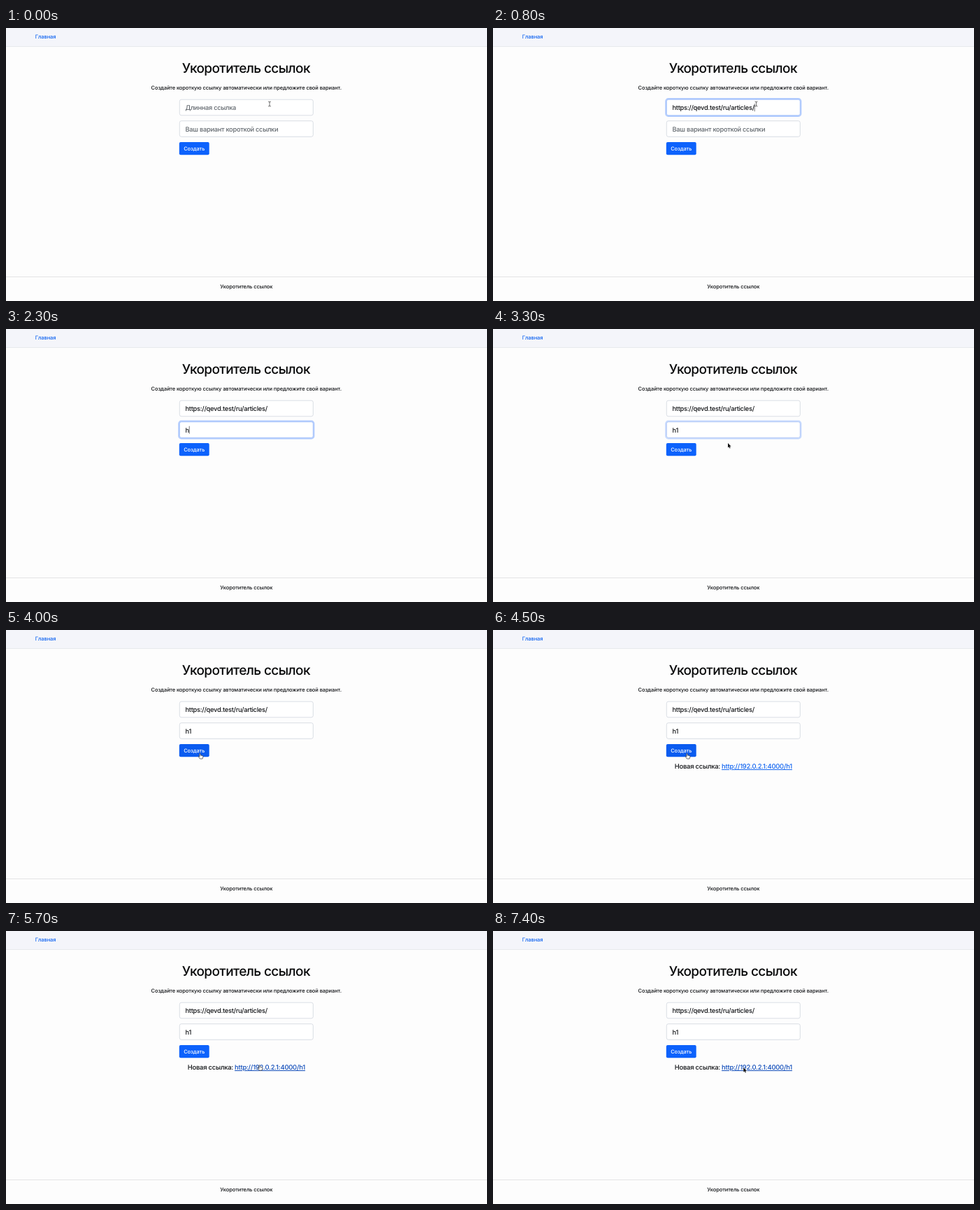
Recreate the animation shown at these times as an HTML page. Size 688 by 390 pixels, loop 8 s.

```html
<!DOCTYPE html>
<html lang="ru">
<head>
<meta charset="utf-8">
<title>Укоротитель ссылок</title>
<style>
  html, body { margin: 0; width: 100%; height: 100%; overflow: hidden; background: #fdfdfd; }
  svg { display: block; width: 100%; height: 100%; }
  text {
    font: 450 7.52px Inter, "Liberation Sans", sans-serif;
    letter-spacing: -.012em; fill: #101215;
    text-rendering: geometricPrecision; white-space: pre;
  }
  .mid { text-anchor: middle; }
  .end { text-anchor: end; }
  .title { font-size: 19px; font-weight: 500; letter-spacing: -.031em; fill: #08090a; }
  .large { font-size: 9.25px; letter-spacing: -.028em; }
  .result { font-size: 9.42px; font-weight: 500; letter-spacing: -.023em; }
  .hint { fill: #63696f; }
  .nav { fill: #0d62f0; }
  .link { text-decoration: underline; }
  .box { fill: #fff; stroke-width: .7; }
  .ring { fill: none; stroke: #0d5efd; stroke-opacity: .3; stroke-width: 2; }
  .caret { stroke: #15171a; stroke-width: .6; }
</style>
</head>
<body>
<svg viewBox="0 0 688 390">
  <rect width="688" height="390" fill="#fdfdfd"/>
  <rect width="688" height="26.5" fill="#f4f5fa"/>
  <path d="M0 26.5H688" stroke="#e4e6e9" stroke-width=".8"/>
  <text class="nav" x="41.7" y="15.4">Главная</text>
  <text class="title mid" x="343.4" y="63.9">Укоротитель ссылок</text>
  <text class="mid" x="343.7" y="87.6">Создайте короткую ссылку автоматически или предложите свой вариант.</text>
  <g id="fields"></g>
  <rect id="button" x="247.8" y="162.9" width="42.9" height="18.4" rx="2"/>
  <text class="mid" x="269.3" y="174.9" style="fill:#fff">Создать</text>
  <g id="result">
    <text class="large result end" x="325" y="198">Новая ссылка:</text>
    <text id="link" class="large result link" x="327" y="198">http://192.0.2.1:4000/h1</text>
  </g>
  <path d="M0 355.5H688" stroke="#e0e1e3" stroke-width=".9"/>
  <text class="mid" x="343.8" y="372">Укоротитель ссылок</text>
  <g id="cursor" stroke-linejoin="round" stroke-linecap="round">
    <path data-kind="beam" fill="none" stroke="#333" stroke-width=".7"
      d="M-1.5-3.4Q0-3.4 0-2.4Q0-3.4 1.5-3.4M0-2.4V2.4M-1.5 3.4Q0 3.4 0 2.4Q0 3.4 1.5 3.4"/>
    <path data-kind="arrow" fill="#111" stroke="#fff" stroke-width=".6" paint-order="stroke"
      d="M0 0V6.6L1.5 5.2L2.5 7.6L3.6 7.1L2.6 4.8H4.6Z"/>
    <path data-kind="hand" fill="#fff" stroke="#222" stroke-width=".65"
      d="M-.7 .7Q0-.4 .6 .7V3L2.3 3.2L4 3.8Q4.5 4.2 4.3 5.4L3.5 8H-.1L-2.1 5.2Q-2.4 4.2-1.4 4.3L-.7 5Z"/>
  </g>
</svg>
<script>
const LOOP = 8000, STEP = 100;
const $ = id => document.getElementById(id);
const clamp = v => Math.max(0, Math.min(1, v));
const ramp = (t, from, to) => clamp((t - from) / (to - from));
const within = (v, a, b) => v >= a && v < b;

function add(parent, tag, attrs) {
  const el = document.createElementNS('http://www.w3.org/2000/svg', tag);
  for (const key in attrs) el.setAttribute(key, attrs[key]);
  return parent.appendChild(el);
}

function makeField(y, hint) {
  const box = { x: 248.3, y, width: 191, height: 22.6, rx: 2.6 };
  const ring = { x: 247.2, y: y - 1.1, width: 193.2, height: 24.8, rx: 3.5, class: 'ring' };
  const g = $('fields');
  return {
    hint, y,
    ring: add(g, 'rect', ring),
    box: add(g, 'rect', { ...box, class: 'box' }),
    text: add(g, 'text', { x: 256.5, y: y + 14.8, class: 'large' }),
    caret: add(g, 'path', { class: 'caret' })
  };
}

const longField = makeField(102.2, 'Длинная ссылка');
const shortField = makeField(132.7, 'Ваш вариант короткой ссылки');

function mix(a, b, k) {
  return `rgb(${a.map((v, i) => Math.round(v + (b[i] - v) * k))})`;
}

function drawField(f, value, focus, caretOn) {
  f.text.textContent = value || f.hint;
  f.text.classList.toggle('hint', !value);
  f.ring.style.opacity = focus;
  f.box.style.stroke = mix([203, 208, 218], [134, 172, 250], focus);
  f.caret.style.display = caretOn ? '' : 'none';
  if (caretOn) {
    const x = 256.5 + (value ? f.text.getComputedTextLength() + .4 : 0);
    f.caret.setAttribute('d', `M${x} ${f.y + 6}v11`);
  }
}

// time, x, y of the pointer's hot spot
const path = [
  [0, 377, 108.5], [100, 376.5, 108.5], [2900, 376.5, 108.5], [3300, 336, 163],
  [3600, 321, 166], [3700, 321, 166], [4000, 277.5, 176], [4700, 277.5, 176],
  [4800, 277, 203], [4900, 275.8, 221], [5100, 271, 225], [5300, 294, 222],
  [5600, 361, 193], [5700, 362.5, 191.2], [6100, 358.3, 195], [LOOP, 358.3, 195]
];

function pointerAt(t) {
  const i = path.findIndex(p => p[0] > t);
  const a = path[i - 1], b = path[i], k = ramp(t, a[0], b[0]);
  return [a[1] + (b[1] - a[1]) * k, a[2] + (b[2] - a[2]) * k];
}

function draw(t) {
  const toSecond = ramp(t, 1200, 1600);
  const firstFocus = ramp(t, 200, 400) * (1 - toSecond);
  const secondFocus = toSecond * (1 - ramp(t, 3200, 3600));
  drawField(longField, t >= 800 ? 'https://qevd.test/ru/articles/' : '',
    firstFocus, within(t, 300, 1300));
  drawField(shortField, t >= 2400 ? 'h1' : t >= 2300 ? 'h' : '',
    secondFocus, within(t, 1300, 1900) || within(t, 2300, 2900));

  const [x, y] = pointerAt(t);
  const hit = (l, top, r, b) => within(x, l, r) && within(y, top, b);
  const overField = hit(248, 102, 440, 125) || hit(248, 132, 440, 156);
  const overButton = hit(248, 163, 291, 181.5);
  const shown = t >= 4500;
  const overLink = shown && hit(327, 189, 428, 201);

  $('button').style.fill = overButton ? '#0b5cf0' : '#0d62fc';
  $('result').style.display = shown ? '' : 'none';
  $('link').style.fill = overLink ? '#0a48b8' : '#0d62f0';

  const kind = overField ? 'beam'
    : overButton || overLink && t < 7400 ? 'hand' : 'arrow';
  const cursor = $('cursor');
  cursor.style.display = within(t, 900, 3000) ? 'none' : '';
  cursor.setAttribute('transform', `translate(${x} ${y})`);
  for (const shape of cursor.children)
    shape.style.display = shape.dataset.kind === kind ? '' : 'none';
}

const start = performance.now();
function tick() {
  const t = (performance.now() - start) % LOOP;
  draw(Math.floor(t / STEP) * STEP);
  requestAnimationFrame(tick);
}
tick();
</script>
</body>
</html>
```
